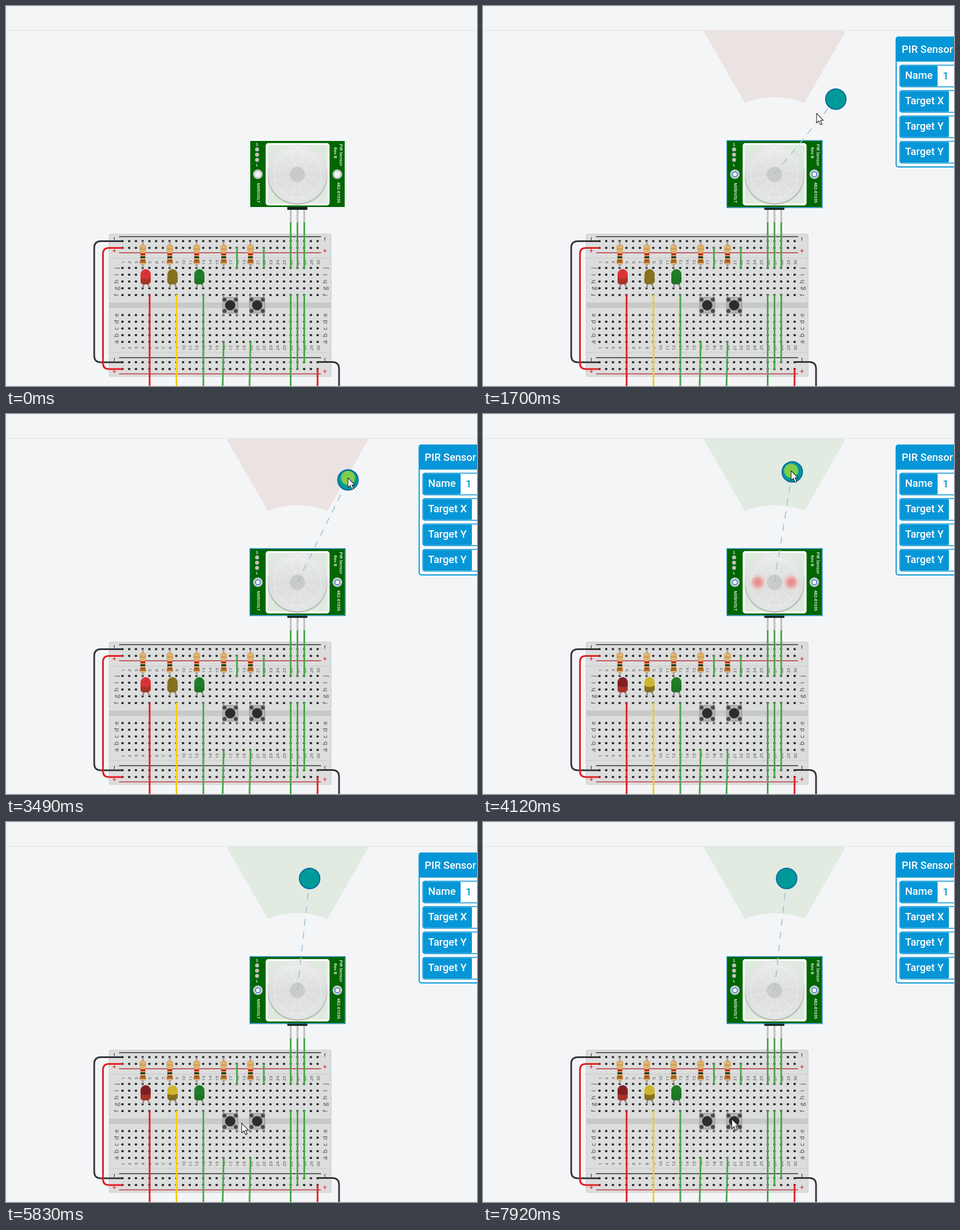
Recreate the animation shown at these times as an HTML page. Size 833 px wide and 673 px high, loop 8000 ms.

```html
<!DOCTYPE html>
<html lang="en">
<head>
<meta charset="utf-8">
<title>Motion sensor circuit</title>
<style>
  html, body { margin: 0; width: 100%; height: 100%; overflow: hidden; background: #f4f5f7; }
  svg { display: block; width: 100%; height: 100%; }
  text { text-anchor: middle; dominant-baseline: central; font-family: "Open Sans", sans-serif; }
  #panel text { text-anchor: start; dominant-baseline: auto; font: 500 18.4px Roboto, sans-serif; fill: #fff; }
  .wire { fill: none; stroke-width: 3; stroke-linecap: round; stroke-linejoin: round; }
</style>
</head>
<body>
<svg id="stage" viewBox="0 0 833 673" xmlns="http://www.w3.org/2000/svg"></svg>
<script>
const PITCH = 11.9, COLS = 30;
const colX = i => 206 + i * PITCH;
const upperRows = [464, 476, 488, 500, 512];
const lowerRows = [547.5, 559.4, 571.3, 583.2, 595];
const railRows = [416.5, 428.5, 631, 643];
const range = n => [...Array(n).keys()];
const each = (list, fn) => list.map(fn).join('');

const rect = (x, y, w, h, fill, more = '') =>
  `<rect x="${x}" y="${y}" width="${w}" height="${h}" fill="${fill}" ${more}/>`;
const circle = (x, y, r, fill, more = '') =>
  `<circle cx="${x}" cy="${y}" r="${r}" fill="${fill}" ${more}/>`;
const path = (d, fill, more = '') => `<path d="${d}" fill="${fill}" ${more}/>`;
const stroke = (d, color, width, more = '') =>
  path(d, 'none', `stroke="${color}" stroke-width="${width}" ${more}`);
const wire = (d, color) => `<path class="wire" d="${d}" stroke="${color}"/>`;
const label = (x, y, s, size, turn = 0, fill = '#444', weight = 400) =>
  `<text transform="translate(${x} ${y}) rotate(${turn})" font-size="${size}" font-weight="${weight}" fill="${fill}">${s}</text>`;

const RED = '#de2022', GREEN = '#49a84c', DARK = '#333538', BLUE = '#0696d7';

function board() {
  const rows = [...railRows, ...upperRows, ...lowerRows];
  const holes = each(rows, y => each(range(COLS), i =>
    circle(colX(i).toFixed(1), y + .8, 2.5, '#f0f0f0') +
    rect((colX(i) - 2.1).toFixed(1), y - 2.1, 4.2, 4, '#303030', 'rx="1.4"')));
  const numbers = each(range(COLS), i =>
    label(colX(i), 454, i + 1, 8, -90) + label(colX(i), 605.5, i + 1, 8, -90));
  const letters = each([194, 563.5], x =>
    each(upperRows, (y, i) => label(x, y, 'jihgf'[i], 11, -90)) +
    each(lowerRows, (y, i) => label(x, y, 'edcba'[i], 11, -90)));
  const signs = each([191.5, 564], x => each([412.5, 626], y =>
    stroke(`M${x} ${y - 3}v6`, '#333', 1.1) +
    stroke(`M${x - 3.2} ${y + 21}h6.4m-3.2 -3.2v6.4`, '#d22', 1.2)));
  return rect(182.5, 404, 392.5, 252, '#dcdddd', 'rx="2" stroke="#c6c7c8"') +
    rect(183, 525, 391.5, 10, '#c9c9c9') +
    stroke('M183 446.5H575M183 613.5H575', '#c9caca', 1) +
    stroke('M200 408.5H557M200 627.5H200M200 623H200M200 627H557', '#2f2f33', 1.4) .replace('M200 627.5H200M200 623H200M200 627H557', 'M200 622.8H557') +
    stroke('M200 437H557M200 651.5H557', '#bd3035', 1.4) +
    holes + numbers + letters + signs;
}

function resistor(x) {
  const bands = [['#c42015', 438, 3.4], ['#15371a', 443.3, 3.4], ['#a05214', 449, 3]];
  return `<g transform="translate(${x} 0)">` +
    stroke('M0 416.5V464', '#999', 2.4) +
    path('M-5.5 426Q-5.5 423 -2 423H2Q5.5 423 5.5 426V431Q5.5 434 4 436V448Q5.5 450 5.5 452V455Q5.5 457.5 2 457.5H-2Q-5.5 457.5 -5.5 455V452Q-5.5 450 -4 448V436Q-5.5 434 -5.5 431Z', '#dfb274', 'stroke="#c99a5c" stroke-width=".6"') +
    each(bands, ([c, y, h]) => rect(-4.2, y, 8.4, h, c)) +
    rect(-5, 429.5, 10, 2, '#c79a4c') + rect(-5, 452.4, 10, 2.5, '#a35c22') + '</g>';
}

const led = (x, id, base) => `<g transform="translate(${x} 0)">` +
  stroke('M-3 490L-5 500M3 490L7 499', '#8d8d8d', 2.6) +
  path('M-9 487V475A9 9 0 0 1 9 475V487Z', '#000', `id="${id}"`) +
  path('M-9 481Q0 486 9 481V489L5 493H-6L-9 490Z', base) + '</g>';

const button = x => `<g transform="translate(${x} 530)">` +
  stroke('M-11.8 -18V18M11.8 -18V18', '#9a9a9a', 2.6) +
  rect(-13.5, -14, 27, 28, '#b5b5b5', 'rx="1.5" stroke="#8c8c8c"') +
  each([-10, 10], dx => each([-10, 10], dy => circle(dx, dy, 3.5, '#484848'))) +
  circle(0, 0, 9, '#2c2c2c', 'stroke="#555" stroke-width=".8"') + '</g>';

function sensor() {
  const spokes = each(range(12), i => {
    const a = (i + .5) * Math.PI / 6, c = Math.cos(a), s = Math.sin(a);
    return `M${13.5 * c} ${13.5 * s}L${44 * c} ${44 * s}`;
  });
  return each([503.5, 515.5, 527.5], x => rect(x - 1.7, 359, 3.4, 24, '#c2c2c2')) +
    rect(497.5, 354, 35.5, 7, '#16221c') +
    rect(432, 239, 167, 117, '#006600') +
    each([445.5, 586], x => circle(x, 298, 8.5, '#c8c9c9') + circle(x, 298, 5.2, '#f3f4f5')) +
    label(444, 245.5, 'S', 7, 0, '#fff', 600) + label(444, 281.5, 'L', 6.5, 0, '#fff', 600) +
    each([254, 263.3, 272.6], y => circle(444, y, 3.5, '#bfc4bf')) +
    label(446.5, 331, 'MERIVOLT', 7.2, 90, '#fff', 600) +
    label(592.5, 264, 'PIR Sensor', 7.6, 90, '#fff', 600) +
    label(583, 260, 'Rev B', 7.6, 90, '#fff', 600) +
    label(588.5, 330.5, '482-61035', 7.6, 90, '#fff', 600) +
    rect(461, 244.5, 109.5, 107, '#dfeade', 'rx="3" stroke="#fafbfa" stroke-width="3.5"') +
    path('M463 298A52.5 52.5 0 0 1 568 298V303A52.5 49 0 0 1 463 303Z', '#bcbdbd') +
    circle(515.5, 297.5, 52, 'url(#dome)') +
    `<g transform="translate(515.5 298)">` +
    stroke(spokes, '#fff', .9, 'opacity=".5"') +
    circle(0, 0, 42, 'none', 'stroke="#fff" opacity=".5"') +
    circle(0, 0, 13.5, '#c9caca') + '</g>' +
    `<g id="spots">` + each([486, 545], x => circle(x, 298, 15, 'url(#glow)')) + '</g>';
}

function panel() {
  const field = (y, name, width) =>
    rect(737, y, 120, 38.5, '#fff', `rx="4" stroke="${BLUE}" stroke-width="1.4"`) +
    rect(738, y + 1, width, 36.5, BLUE, 'rx="2"') +
    `<text x="746.5" y="${y + 24.5}">${name}</text>`;
  return rect(730.7, 55, 140, 230, '#f8f9fa', `rx="4" stroke="${BLUE}" stroke-width="2"`) +
    rect(730, 54.5, 140, 44, BLUE, 'rx="4"') +
    '<text x="740.5" y="83">PIR Sensor</text>' +
    field(104.7, 'Name', 66) + `<text x="813" y="129.5" style="fill:${BLUE}">1</text>` +
    field(149.7, 'Target X', 86) + field(194.7, 'Target Y', 86) + field(239.7, 'Target Y', 86);
}

const stage = document.getElementById('stage');
stage.innerHTML = `
  <defs>
    <linearGradient id="dome" x1="0" y1="0" x2="0" y2="1">
      <stop offset="0" stop-color="#ebecec"/><stop offset=".55" stop-color="#dcdddd"/><stop offset="1" stop-color="#e4e5e5"/>
    </linearGradient>
    <radialGradient id="glow">
      <stop offset="0" stop-color="#e98080"/><stop offset=".5" stop-color="#ea9c9c" stop-opacity=".9"/>
      <stop offset=".72" stop-color="#eebbbb" stop-opacity=".7"/><stop offset="1" stop-color="#eecccc" stop-opacity=".15"/>
    </radialGradient>
  </defs>` +
  rect(0, 0, 833, 673, '#f4f5f7') + rect(0, 42.5, 833, 1, '#dfe1e3') +
  path('M389.5 43.5H642L568.5 171.5A143 143 0 0 0 463 171.5Z', '#ebe2e2', 'id="cone"') +
  board() +
  wire('M206 416.5H168Q156 416.5 156 428.5V619Q156 631 168 631H206', DARK) +
  wire('M206 428.5H182Q171.5 428.5 171.5 439V632.5Q171.5 643 182 643H206', RED) +
  wire('M551 630.5H577Q589 630.5 589 642.5V680', DARK) +
  wire('M551 643V680M254 512V680', RED) + wire('M301.5 512V680', '#f2cf1d') +
  wire('M349 512V680M385 595L383 680M432.5 595L430.5 680M408.5 428.5V464M456 428.5V464', GREEN) +
  wire('M503.5 512V680M515.5 512V643M527.5 512V631M503.5 382V464M515.5 382V464M527.5 382V464', GREEN) +
  each([242, 289.7, 337.2, 385, 432.4], resistor) +
  led(247, 'redLed', '#a83427') + led(294.5, 'yellowLed', '#84701f') + led(342, 'greenLed', '#1f7526') +
  button(396.5) + button(444.2) + sensor() +
  `<g id="selection">` +
  rect(431.5, 238.5, 168.5, 118.5, 'none', 'stroke="#1b82b5" stroke-width="1.5"') +
  each([445.5, 586], x => circle(x, 298, 4.4, '#f3f4f5', 'stroke="#3c86d2" stroke-width="1.8"')) +
  stroke('', '#a3c6d9', 2, 'id="beam" stroke-dasharray="12 11" opacity=".9"') +
  circle(0, 0, 18, '#009999', 'id="target" stroke="#0a6ba2" stroke-width="2"') + '</g>' +
  `<g id="panel">${panel()}</g><g id="hover"></g>` +
  `<g id="cursor">` + circle(0, 0, 12.5, '#ff0', 'id="press" opacity=".5"') +
  path('M0 0V17L4 13.4L6.9 20.3L9.7 19.1L6.9 12.4H12Z', '#fff', 'stroke="#222" stroke-width="1.1" stroke-linejoin="round"') + '</g>';

const ui = {};
stage.querySelectorAll('[id]').forEach(el => ui[el.id] = el);

// Tracks hold [time, x, y]; values are linear between entries.
const approach = [
  [150, 735, 638], [300, 665, 540], [460, 535, 345], [530, 463, 295], [690, 465, 294], [1000, 532, 279],
  [1090, 532, 279], [1160, 538, 263], [1460, 569, 214], [1630, 590, 190], [1930, 633, 150],
  [2020, 633, 150], [2240, 628, 156], [2620, 626, 160]
];
const drag = [
  [2620, 624, 165], [2700, 628, 160], [2870, 628, 160], [2950, 633, 154], [3180, 635, 140],
  [3410, 618, 121], [3640, 581, 109], [3880, 547, 102.5], [4120, 547, 102.5], [4270, 537, 100]
];
const grip = [[2620, 2, -5], [2900, 2, -5], [4100, -2, -2]];
const departure = [
  [4350, 535, 98], [4430, 535, 140], [4590, 518, 330], [4730, 490, 428], [4810, 475, 503], [4890, 476, 497],
  [5200, 476, 497], [5430, 460, 520], [5700, 425, 533], [5980, 406, 534], [6130, 398, 531],
  [7300, 398, 531], [7900, 440, 526]
];

function at(track, t) {
  const i = track.findIndex(k => k[0] > t);
  if (i === 0) return track[0].slice(1);
  if (i < 0) return track[track.length - 1].slice(1);
  const [t0, x0, y0] = track[i - 1], [t1, x1, y1] = track[i];
  const p = (t - t0) / (t1 - t0);
  return [x0 + (x1 - x0) * p, y0 + (y1 - y0) * p];
}

// Marks every hole connected to the one under the pointer.
function hoverMarks(x, y) {
  const col = Math.round((x - 206) / PITCH);
  if (col < 0 || col >= COLS) return '';
  const near = rows => rows.find(r => Math.abs(r - y) < 5);
  const strip = [upperRows, lowerRows].find(near);
  const rail = near(railRows);
  if (!strip && !rail) return '';
  const marks = strip ? strip.map(r => [colX(col), r]) : range(COLS).map(i => [colX(i), rail]);
  const row = rail || near(strip);
  return each(marks, ([mx, my]) => circle(mx, my, 4, '#e4efd0', 'stroke="#82b93c" stroke-width="1.5"') +
      circle(mx, my, 1.4, '#55603f')) +
    rect(colX(col) - 5.5, row - 5.5, 11, 11, '#111') + rect(colX(col) - 3, row - 3, 6, 6, '#e01414');
}

const show = (el, on) => el.setAttribute('visibility', on ? 'visible' : 'hidden');
const fill = (el, color) => el.setAttribute('fill', color);
const between = (t, a, b) => t >= a && t < b;

const LOOP = 8000, STEP = 77.6;

function render(now) {
  const t = Math.floor((now % LOOP + 6) / STEP) * STEP;
  const [tx, ty] = at(drag, t);
  const [gx, gy] = at(grip, t);
  const [cx, cy] = t < 2620 ? at(approach, t) : t < 4350 ? [tx + gx, ty + gy] : at(departure, t);
  const detected = t >= 3635;
  const crossing = between(t, 6740, 6980);

  ui.cursor.setAttribute('transform', `translate(${cx} ${cy})`);
  show(ui.cursor, t >= 150);
  show(ui.press, between(t, 2620, 4350) || between(t, 6670, 6980));
  show(ui.selection, t >= 1155);
  show(ui.cone, t >= 1155);
  fill(ui.cone, detected ? '#e1ebe2' : '#ebe2e2');
  show(ui.spots, between(t, 3635, 5590));
  ui.panel.setAttribute('opacity', t < 1155 ? 0 : Math.min(1, .01 + Math.max(0, t - 1170) / 280));
  ui.target.setAttribute('cx', tx);
  ui.target.setAttribute('cy', ty);
  const reach = 1 - 19 / Math.hypot(tx - 515.5, ty - 298);
  ui.beam.setAttribute('d', `M515.5 298L${515.5 + (tx - 515.5) * reach} ${298 + (ty - 298) * reach}`);
  fill(ui.redLed, detected ? '#7f2024' : '#d93336');
  fill(ui.yellowLed, detected && !crossing ? '#cfb432' : '#86711f');
  fill(ui.greenLed, crossing ? '#36c043' : '#1f7d27');
  ui.hover.innerHTML = t >= 4350 ? hoverMarks(cx, cy) : '';
  requestAnimationFrame(render);
}
render(0);
</script>
</body>
</html>
```
